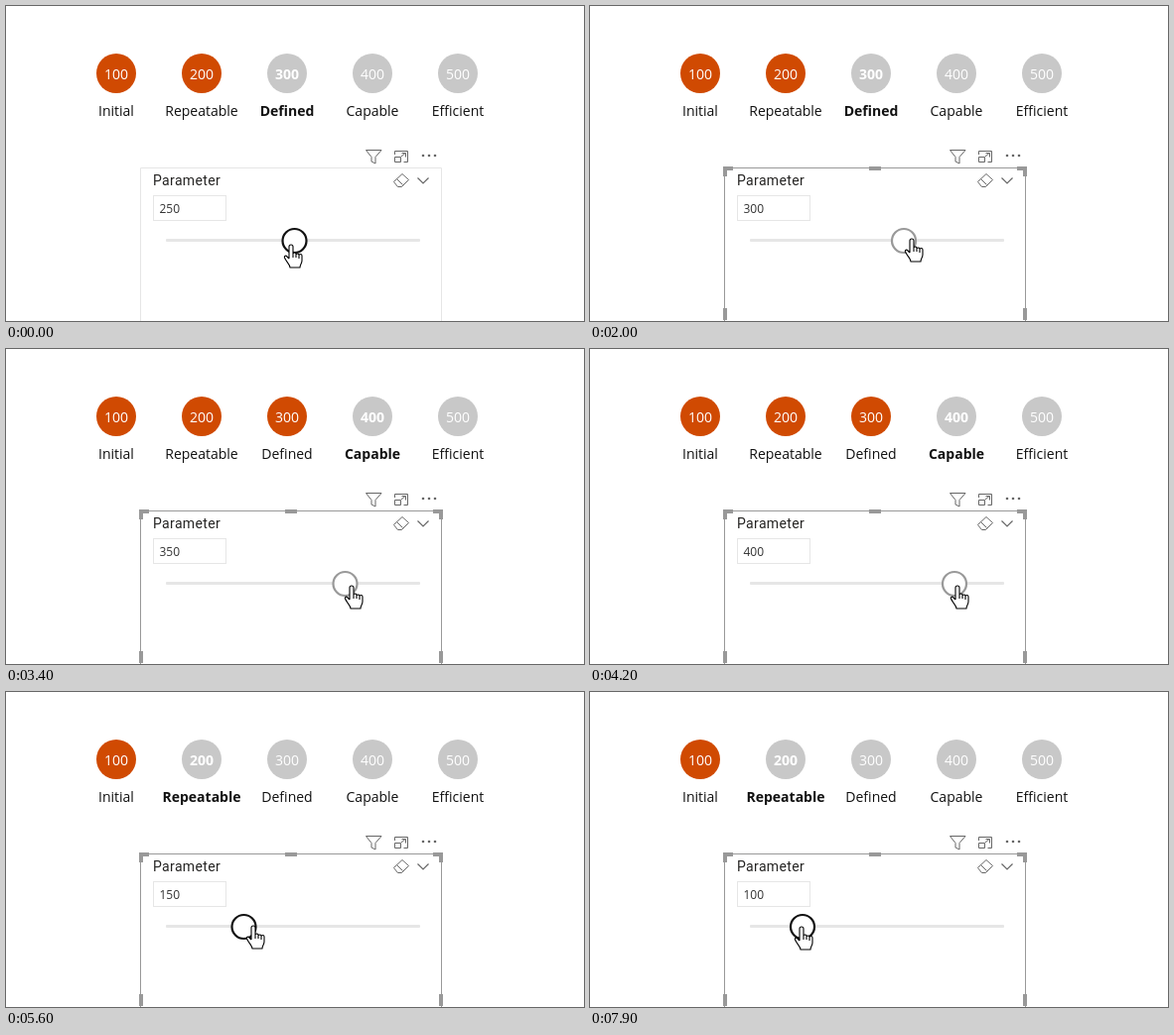
An HTML page that plays this animation: 582x318 px, repeating every 8000 ms.

```html
<!DOCTYPE html>
<html lang="en">
<head>
<meta charset="utf-8">
<style>
html, body { margin: 0; width: 100%; height: 100%; overflow: hidden; background: #fff; }
svg { display: block; }
text { font-family: "Open Sans", "Noto Sans", sans-serif; }
#steps text { font-size: 14px; text-anchor: middle; fill: #111; }
#steps .num { fill: #fff; }
#steps .bold text { font-weight: 700; }
.icon { fill: none; stroke: #666; stroke-width: 1; }
#handles { fill: none; stroke: #999; stroke-width: 4; }
.cursor { fill: #fff; stroke: #000; stroke-width: 1.1; stroke-linejoin: round; }
</style>
</head>
<body>
<svg width="582" height="318" viewBox="0 0 582 318">
  <g id="steps"></g>

  <g class="icon">
    <path d="M362.5 145.5h15.5l-6 7v6.5l-4-2v-4.5z"/>
    <path d="M391.5 150v-3.5h13v11h-4M391.5 152.500h6v5h-6zM398 152l4-3.500M398.500 148.500h4v4"/>
    <path d="M390.500 177.500l8.500-8 6.500 6-7 7h-4zM393.500 174.500l6 6"/>
    <path d="M414.500 173.500l5.500 5.500 5.500-5.500" stroke-width="1.200"/>
  </g>
  <g fill="#666">
    <circle cx="420" cy="151" r="1.300"/><circle cx="426" cy="151" r="1.300"/><circle cx="432" cy="151" r="1.300"/>
  </g>

  <path id="panel" d="M135.500 320V163.500H438.500V320" fill="none"/>
  <path id="handles" d="M136 172V164H144M430 164H438V172M281 164H293M136 305V317M438 305V317"/>
  <text x="148" y="181" font-size="14" fill="#252423" letter-spacing=".35" style="font-family:Roboto,sans-serif">Parameter</text>
  <rect x="148.500" y="191.500" width="73" height="25" fill="#fff" stroke="#e6e6e6"/>
  <text id="value" x="154.500" y="209" font-size="12" fill="#333"></text>
  <rect x="161" y="235" width="256" height="3" rx="1" fill="#e6e6e6"/>
  <circle id="knob" cy="237" r="12" fill="#fff" stroke-width="2.200"/>

  <path id="arrow" class="cursor" d="M.5 .5V16.500l3.700-3.500 2.500 5.600 2.500-1.100-2.400-5.500h5z"/>
  <path id="hand" class="cursor" d="M-2 14V2a2 2 0 0 1 4 0V9a1.600 1.600 0 0 1 3 0v1a1.600 1.600 0 0 1 3 0v1a1.500 1.500 0 0 1 3 0v5c0 3-2 4-2 7H-1c0-3-4-6-5.500-10c-.5-2 1.500-2.500 2.500-1L-2 14M2 9v4M5 10v3M8 11v3"/>
</svg>
<script>
const LOOP = 8000, TICK = 100;
const $ = id => document.getElementById(id);

const steps = ['Initial', 'Repeatable', 'Defined', 'Capable', 'Efficient'].map((name, i) => {
  const x = 111 + 86 * i, level = 100 * (i + 1);
  $('steps').insertAdjacentHTML('beforeend',
    `<g><circle cx="${x}" cy="68" r="20"/>
     <text class="num" x="${x}" y="73.500">${level}</text>
     <text x="${x}" y="111">${name}</text></g>`);
  return { level, node: $('steps').lastElementChild };
});

// [time, value]: the slider reacts first, the steps follow
const sliderKeys = [[0, 250], [1900, 300], [2900, 350], [3900, 400], [5200, 150], [7700, 100]];
const stepKeys = [[0, 250], [2300, 300], [3300, 350], [4300, 400], [5500, 150]];

// [time, x, y] of the pointer tip
const path = [
  [0, 287, 241], [300, 287, 241], [900, 317, 246], [1000, 323, 243], [1500, 324, 235],
  [2800, 324, 235], [3200, 348, 239], [3600, 348, 239], [4000, 370, 239], [4600, 370, 239],
  [4900, 203, 239], [5000, 203, 239], [5300, 238, 235], [5500, 238, 235], [5900, 306, 239],
  [6500, 306, 239], [6600, 292, 235], [7000, 180, 238], [7400, 213, 237], [LOOP, 213, 237]
];

const held = (keys, t) => keys.filter(k => k[0] <= t).pop()[1];

function pointer(t) {
  const i = path.findIndex(k => k[0] > t);
  const [t0, x0, y0] = path[i - 1], [t1, x1, y1] = path[i];
  const p = (t - t0) / (t1 - t0), e = p * p * (3 - 2 * p);
  return [x0 + (x1 - x0) * e, y0 + (y1 - y0) * e];
}

function draw(t) {
  const value = held(sliderKeys, t), shown = held(stepKeys, t);
  for (const { level, node } of steps) {
    node.firstElementChild.setAttribute('fill', level <= shown ? '#d04a02' : '#c8c8c8');
    node.classList.toggle('bold', level > shown && level - shown < 100);
  }

  const selected = t >= 1700;
  $('panel').setAttribute('stroke', selected ? '#999' : '#e6e6e6');
  $('handles').style.display = selected ? '' : 'none';

  const knobX = 163 + 0.51 * value, [x, y] = pointer(t);
  const hover = Math.hypot(x - knobX, y - 237) < 13;
  const focused = t >= 1900 && t < 5200;
  $('value').textContent = value;
  $('knob').setAttribute('cx', knobX);
  $('knob').setAttribute('stroke', focused ? (t < 4700 ? '#999' : '#888') : hover ? '#111' : '#605e5c');

  for (const [id, on] of [['hand', hover], ['arrow', !hover]]) {
    $(id).style.display = on ? '' : 'none';
    $(id).setAttribute('transform', `translate(${Math.round(x)} ${Math.round(y)})`);
  }
}

const start = performance.now();
function frame() {
  const t = Math.max(0, performance.now() - start) % LOOP;
  draw(Math.floor(t / TICK) * TICK);
  requestAnimationFrame(frame);
}
frame();
</script>
</body>
</html>
```
